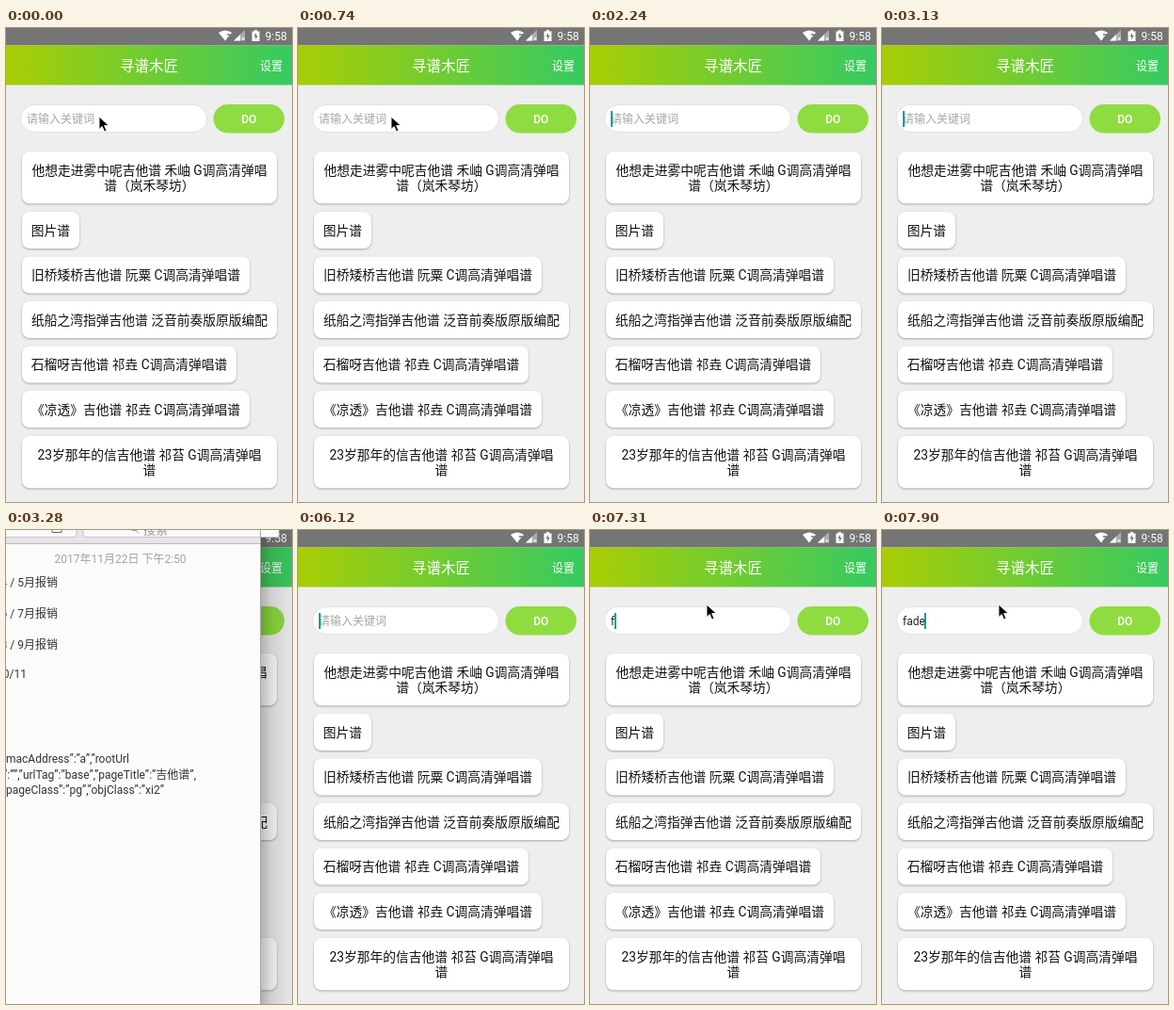
An HTML page for the animation above (8 s loop, 304 by 503 pixels).

```html
<!DOCTYPE html>
<html lang="zh-CN">
<head>
<meta charset="utf-8">
<title>吉他谱搜索</title>
<style>
  html, body { margin: 0; width: 100%; height: 100%; overflow: hidden; background: #eee; }
  svg { display: block; width: 100%; height: 100%; }
  text { font: 12px Roboto, "Noto Sans CJK SC", "Noto Sans CJK", sans-serif; white-space: pre; }
  .mid { text-anchor: middle; }
  .end { text-anchor: end; }
  .white { fill: #fff; }
  .bubble { fill: #fff; filter: drop-shadow(0 1px 1px rgba(0, 0, 0, .3)); }
  .row { font-size: 13.75px; fill: #111; }
  .note { fill: #333; }

  #caret, #mouse, #notes, #hint, #typed tspan { animation: 8s step-end infinite; }
  #caret { animation-name: caret; }
  #mouse { animation-name: mouse; }
  #notes { animation-name: notes; }
  #hint { animation-name: hint; }
  #typed tspan:nth-child(1) { animation-name: key1; }
  #typed tspan:nth-child(2) { animation-name: key2; }
  #typed tspan:nth-child(3) { animation-name: key3; }
  #typed tspan:nth-child(4) { animation-name: key4; }

  @keyframes caret {
    0%, 9.25%, 20.5%, 33.5%, 84% { opacity: 0; transform: translateX(22px); }
    1.875%, 14.875%, 28%, 39.125%, 89.625% { opacity: 1; transform: translateX(22px); }
    91.375% { opacity: 1; transform: translateX(26px); }
    93.25% { opacity: 1; transform: translateX(32px); }
    97% { opacity: 1; transform: translateX(39px); }
    98.75%, 100% { opacity: 1; transform: translateX(45px); }
  }
  @keyframes mouse {
    0% { opacity: 1; transform: translate(98px, 93px); }
    18.625% { opacity: 0; transform: translate(98px, 93px); }
    80.25% { opacity: 1; transform: translate(126px, 80px); }
    82.125% { opacity: 1; transform: translate(148px, 88px); }
    84%, 100% { opacity: 1; transform: translate(123px, 78px); }
  }
  @keyframes notes { 0%, 76.5%, 100% { opacity: 0; } 41% { opacity: 1; } }
  @keyframes hint { 0% { opacity: 1; } 91.375%, 100% { opacity: 0; } }
  @keyframes key1 { 0% { fill-opacity: 0; } 91.375%, 100% { fill-opacity: 1; } }
  @keyframes key2 { 0% { fill-opacity: 0; } 93.25%, 100% { fill-opacity: 1; } }
  @keyframes key3 { 0% { fill-opacity: 0; } 97%, 100% { fill-opacity: 1; } }
  @keyframes key4 { 0% { fill-opacity: 0; } 98.75%, 100% { fill-opacity: 1; } }
</style>
</head>
<body>
<svg viewBox="0 0 304 503">
  <defs>
    <linearGradient id="bar">
      <stop offset="0" stop-color="#a9cd04"/>
      <stop offset="1" stop-color="#36ca62"/>
    </linearGradient>
    <linearGradient id="shade">
      <stop offset="0" stop-color="#000" stop-opacity=".26"/>
      <stop offset=".35" stop-color="#000" stop-opacity=".12"/>
      <stop offset="1" stop-color="#000" stop-opacity=".03"/>
    </linearGradient>
  </defs>

  <rect width="304" height="503" fill="#eee"/>

  <!-- status bar -->
  <rect width="304" height="18.5" fill="#757575"/>
  <path class="white" d="M226 5Q233 0 240 5L233 13.5Z"/>
  <path d="M235 7h3v2l-2 1.500v2" fill="none" stroke="#757575" stroke-width="1.300"/>
  <path class="white" d="M242 13.500L254 2V13.500Z" opacity=".4"/>
  <path class="white" d="M242 13.500L249 7V13.500Z"/>
  <path d="M250.500 10l3 3m0-3l-3 3" stroke="#fff"/>
  <path class="white" d="M261.500 3.500h2.500v-1.500h3v1.500h2.500v10.500h-8Z"/>
  <path d="M266 5l-2.500 4h1.700v3.500l2.500-4.500h-1.700Z" fill="#757575"/>
  <text class="white" x="275.500" y="13">9:58</text>

  <!-- header -->
  <rect y="18.500" width="304" height="42" fill="url(#bar)"/>
  <text class="white mid" x="152" y="46" style="font-size:15.500px">寻谱木匠</text>
  <text class="white" x="270" y="44.500">设置</text>

  <!-- search -->
  <rect x="15.500" y="81.500" width="198" height="29" rx="14.500" fill="#fff" stroke="#e2e2e2"/>
  <rect x="220.500" y="81" width="75.500" height="30.500" rx="15.250" fill="#8fdc40"/>
  <text class="white mid" x="258.300" y="101" style="font-weight:500">DO</text>
  <text id="hint" x="22" y="101" fill="#a6a6a6">请输入关键词</text>
  <text id="typed" x="22" y="101" fill="#222"><tspan>f</tspan><tspan>a</tspan><tspan>d</tspan><tspan>e</tspan></text>
  <rect id="caret" y="88" width="2" height="17" fill="#009f93"/>

  <g id="list"></g>

  <g id="notes">
    <rect x="271" width="33" height="503" fill="url(#shade)"/>
    <rect width="271" height="503" fill="#fbfbf9"/>
    <rect width="271" height="14" fill="#e6e4e6"/>
    <path d="M0 14.500H271" stroke="#bcbabc"/>
    <path d="M-5-5H75V4.500a3 3 0 0 1-3 3H-5Z" fill="#fafafa" stroke="#c8c6c8"/>
    <path d="M49-3V2.500h10V-3" fill="none" stroke="#666"/>
    <path d="M290-5H82V4.500a3 3 0 0 0 3 3H290Z" fill="#fafafa" stroke="#c8c6c8"/>
    <path d="M138 0l3 3.500" stroke="#999"/>
    <circle cx="136" cy="-2" r="3" fill="none" stroke="#999"/>
    <rect x="271" width="20" height="14.500" fill="#757575" opacity="0"/>
    <text x="146" y="4" fill="#999" style="font-size:13px">搜索</text>
    <path d="M270.500 0V503" stroke="#aaa"/>
    <text class="mid" x="121.500" y="35" fill="#a3a3a3">2017年11月22日 下午2:50</text>
  </g>

  <path id="mouse" d="M1 1V14.500L4.200 11.500L6.600 17L9 16L6.600 10.600H11.300Z" stroke="#fff" stroke-width=".9"/>
</svg>
<script>
  const rows = [
    [131, 271, "他想走进雾中呢吉他谱 禾岫 G调高清弹唱", "谱（岚禾琴坊）"],
    [195, 61, "图片谱"],
    [242.5, 242, "旧桥矮桥吉他谱 阮粟 C调高清弹唱谱"],
    [290, 271, "纸船之湾指弹吉他谱 泛音前奏版原版编配"],
    [337.5, 228, "石榴呀吉他谱 祁垚 C调高清弹唱谱"],
    [385, 242, "《凉透》吉他谱 祁垚 C调高清弹唱谱"],
    [433, 271, "23岁那年的信吉他谱 祁苔 G调高清弹唱", "谱"],
  ];
  const noteLines = [
    [55, 59.5, "4 / 5月报销"],
    [55, 92.5, "6 / 7月报销"],
    [55, 125.5, "8 / 9月报销"],
    [22, 157, "10/11"],
    [131, 247, "”macAddress”:”a”,”rootUrl"],
    [202, 263.5, "”:””,”urlTag”:”base”,”pageTitle”:”吉他谱”,"],
    [168, 280, "”pageClass”:”pg”,”objClass”:”xi2”"],
  ];

  function add(parent, tag, attrs, text = "") {
    const el = document.createElementNS("http://www.w3.org/2000/svg", tag);
    for (const name in attrs) el.setAttribute(name, attrs[name]);
    el.textContent = text;
    parent.append(el);
  }

  const list = document.getElementById("list");
  for (const [y, width, ...lines] of rows) {
    const height = 39 + 16.3 * (lines.length - 1);
    add(list, "rect", { class: "bubble", x: 17, y, width, height, rx: 8 });
    lines.forEach((line, i) =>
      add(list, "text", { class: "row mid", x: 17 + width / 2, y: y + 24.5 + 16.3 * i }, line));
  }

  const notes = document.getElementById("notes");
  for (const [x, y, line] of noteLines) add(notes, "text", { class: "note end", x, y }, line);
</script>
</body>
</html>
```
